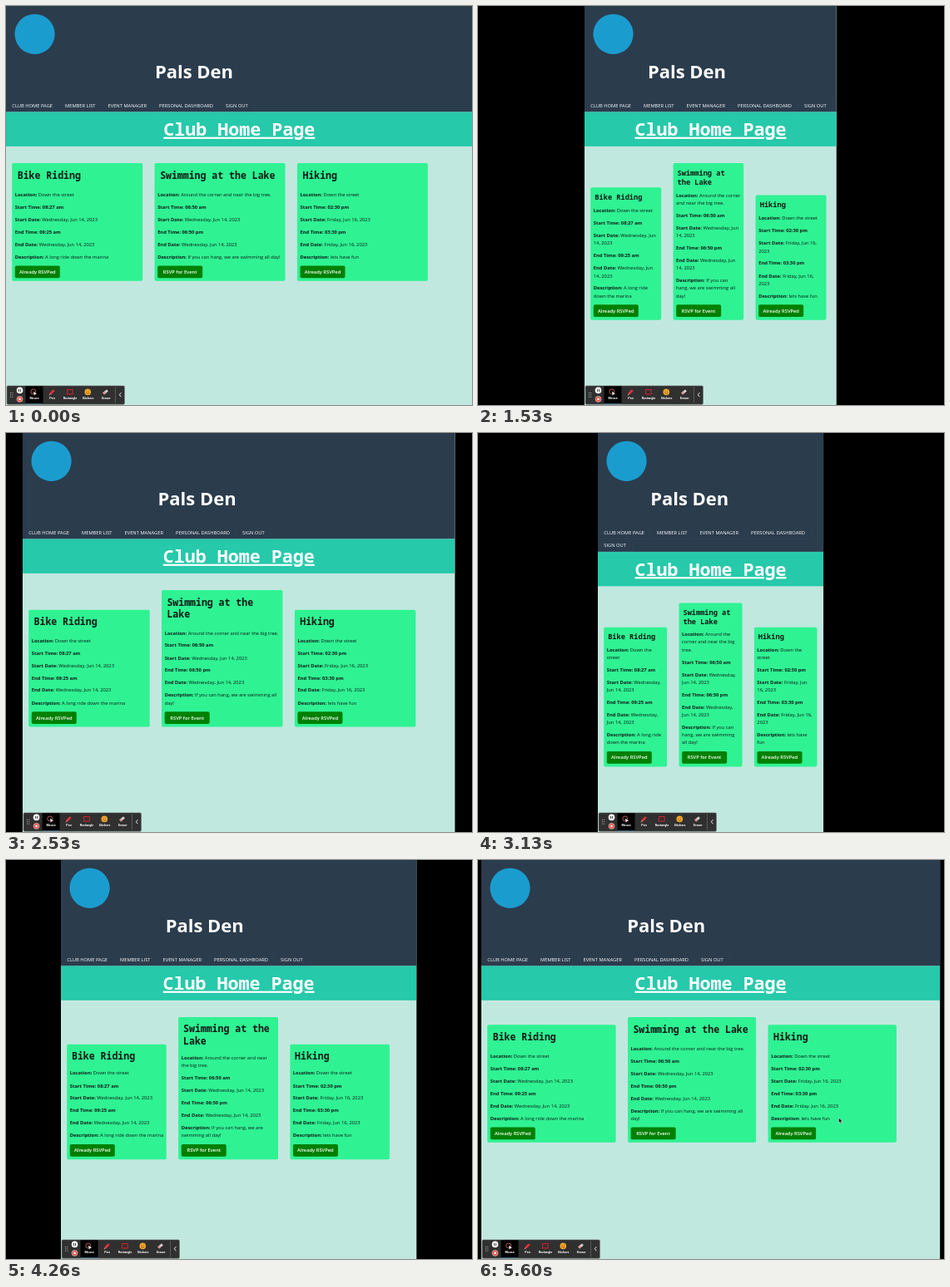
Write an HTML page that moves like this. It is 560 px wide and 480 px high and loops after 5.66 s.

```html
<!DOCTYPE html>
<html lang="en">
<head>
<meta charset="utf-8">
<title>Club Home Page</title>
<style>
  html, body { margin: 0; width: 100%; height: 100%; overflow: hidden; background: #000; }
  #stage { position: relative; width: 560px; height: 480px; overflow: hidden; }
  #page {
    position: absolute; top: 0; height: 1334px; overflow: hidden;
    transform: scale(.36); transform-origin: 0 0;
    background: #c1e8df; color: #0b1a14;
    font: 16px/1.6 "Open Sans", "Noto Sans", sans-serif;
  }
  header { background: #2b3c4d; padding-top: 311px; color: #fff; }
  .logo {
    position: absolute; left: 29px; top: 27px; width: 134px; height: 134px;
    border-radius: 50%; background: #1b9ccf;
  }
  h1 {
    position: absolute; left: 5px; top: 180px; width: 80%; margin: 0;
    text-align: center; font-size: 61px; line-height: 80px;
  }
  nav { display: flex; flex-wrap: wrap; }
  nav span {
    padding: 0 20.3px; line-height: 42px; white-space: nowrap;
    border: solid rgba(60, 110, 165, .22); border-width: 0 1px 1px 0;
  }
  .title {
    background: #26c9aa; color: #fff; text-align: center; white-space: nowrap;
    font: bold 60.2px/115px "Noto Sans Mono", "DejaVu Sans Mono", monospace;
    text-decoration: underline;
  }
  main { display: flex; align-items: flex-end; margin-top: 56px; }
  .card {
    flex: none; box-sizing: border-box; width: 28%; margin: 0 20px;
    padding: 10px; border-radius: 5px; background: #2ff293;
  }
  h2 {
    margin: calc(2% + 2.8px) 2% calc(7.2% + 2.4px);
    font: bold 32px/1.25 "Noto Sans Mono", "DejaVu Sans Mono", monospace;
  }
  .narrow h2 { font-size: 24px; }
  p { margin: 0 0 16px; }
  .button {
    width: 150px; line-height: 41px; border-radius: 5px; background: #008000;
    color: #fff; font-weight: 600; text-align: center; white-space: nowrap;
  }
  #tools { position: absolute; left: 0; bottom: 0; width: 397.2px; height: 69.4px; }
  #tools text { font: 600 3.7px Roboto, Arial, sans-serif; fill: #fff; text-anchor: middle; }
  #cursor { position: absolute; left: 0; top: 0; width: 6px; height: 9px; }
</style>
</head>
<body>
<div id="stage">
  <div id="page">
    <header>
      <div class="logo"></div>
      <h1>Pals Den</h1>
      <nav>
        <span>CLUB HOME PAGE</span><span>MEMBER LIST</span><span>EVENT MANAGER</span><span>PERSONAL DASHBOARD</span><span>SIGN OUT</span>
      </nav>
    </header>
    <div class="title">Club Home Page</div>
    <main></main>
    <svg id="tools" viewBox="0 455 143 25">
      <rect x="1" y="456.5" width="141.5" height="22.3" rx="1.5" fill="#303030" stroke="#666" stroke-width=".6"/>
      <path d="M5.5 464.5v6M7.7 464.5v6" stroke="#bbb" stroke-dasharray="1 1.4"/>
      <circle cx="16.5" cy="462" r="3.8" fill="#fff"/>
      <path d="M15.5 460.4v3.2M17.5 460.4v3.2" stroke="#333" stroke-width=".9"/>
      <circle cx="16.5" cy="472.5" r="3.4" fill="#e5392f" stroke="#fff" stroke-width=".6"/>
      <rect x="15.2" y="471.2" width="2.6" height="2.6" fill="#fff"/>
      <rect x="23.5" y="457" width="21" height="21" fill="#000"/>
      <path d="M23.5 478h21" stroke="#38658c" stroke-width=".8"/>
      <circle cx="32.8" cy="463.6" r="3" fill="none" stroke="#e26a6a" stroke-width=".8"/>
      <path d="M33 463l4 3.5-2 .2-1.2 1.7z" fill="#fff"/>
      <path d="M53 466.5l4.7-4.7" stroke="#e8323c" stroke-width="2.6"/>
      <path d="M51.8 467.8l1.6-1.6" stroke="#f3b0a8"/>
      <rect x="73.6" y="461.2" width="6.6" height="5.4" fill="none" stroke="#e8202c" stroke-width=".9"/>
      <circle cx="98.3" cy="464" r="3.8" fill="#f2a62b"/>
      <path d="M96.4 464.7q1.9 2.6 3.8 0" fill="none" stroke="#7b3d12" stroke-width=".7"/>
      <path d="M96.8 462.8h.8M99 462.8h.8" stroke="#7b3d12" stroke-width=".8"/>
      <path d="M117.2 466l4.8-4" stroke="#d6d0d2" stroke-width="2.8"/>
      <path d="M117.2 466l2-1.7" stroke="#e58a92" stroke-width="2.8"/>
      <text x="34" y="472.8">Mouse</text>
      <text x="55.5" y="472.8">Pen</text>
      <text x="77" y="472.8">Rectangle</text>
      <text x="98.7" y="472.8">Stickers</text>
      <text x="120.4" y="472.8">Eraser</text>
      <path d="M131.5 458v19" stroke="#777" stroke-width=".6"/>
      <path d="M138.4 464.8l-2 2.5 2 2.5" fill="none" stroke="#fff" stroke-width=".9"/>
    </svg>
  </div>
  <svg id="cursor" viewBox="0 0 6 9">
    <path d="M.5.5v6.3l1.5-1.3 1 2.4 1.1-.5-1-2.2h2z" fill="#000" stroke="#fff" stroke-width=".5"/>
  </svg>
</div>
<script>
const LOOP = 5660, SCALE = .36, CENTER = 279.75;
const page = document.getElementById("page");
const cursor = document.getElementById("cursor");

const wed = "Wednesday, Jun 14, 2023", fri = "Friday, Jun 16, 2023";
const events = [
  ["Bike Riding", "Down the street", "08:27 am", wed, "09:25 am", "A long ride down the marina", "Already RSVPed"],
  ["Swimming at the Lake", "Around the corner and near the big tree.", "06:50 am", wed, "06:50 pm", "If you can hang, we are swimming all day!", "RSVP for Event"],
  ["Hiking", "Down the street", "02:30 pm", fri, "03:30 pm", "lets have fun", "Already RSVPed"]
];
document.querySelector("main").innerHTML = events.map(([name, place, start, date, end, about, action]) => `
  <div class="card">
    <h2>${name}</h2>
    <p><b>Location:</b> ${place}</p>
    <p><b>Start Time: ${start}</b></p>
    <p><b>Start Date:</b> ${date}</p>
    <p><b>End Time: ${end}</b></p>
    <p><b>End Date:</b> ${date}</p>
    <p><b>Description:</b> ${about}</p>
    <div class="button">${action}</div>
  </div>`).join("");

// [time in ms, page width in stage pixels]
const widths = [
  [0, 560.5], [60, 560.5], [600, 447], [930, 307], [1100, 275], [1250, 270], [1400, 276],
  [1800, 358], [2000, 420], [2400, 520], [2530, 520], [3000, 276], [3130, 271],
  [3530, 270], [3730, 270], [4260, 427], [4860, 551], [LOOP, 551]
];

function widthAt(t) {
  const i = widths.findIndex(([time]) => time > t);
  const [t0, w0] = widths[i - 1], [t1, w1] = widths[i];
  return w0 + (w1 - w0) * (t - t0) / (t1 - t0);
}

function draw() {
  const t = performance.now() % LOOP;
  const w = widthAt(t);
  page.style.width = w / SCALE + "px";
  page.style.left = CENTER - w / 2 + "px";
  page.classList.toggle("narrow", w / SCALE < 992);

  const k = Math.min(1, Math.max(0, (t - 4930) / 670));
  const ease = 1 - (1 - k) ** 2;
  cursor.style.display = k > 0 ? "block" : "none";
  cursor.style.transform = `translate(${548 - 115 * ease}px, ${250 + 59.5 * ease}px)`;
  requestAnimationFrame(draw);
}
draw();
</script>
</body>
</html>
```
